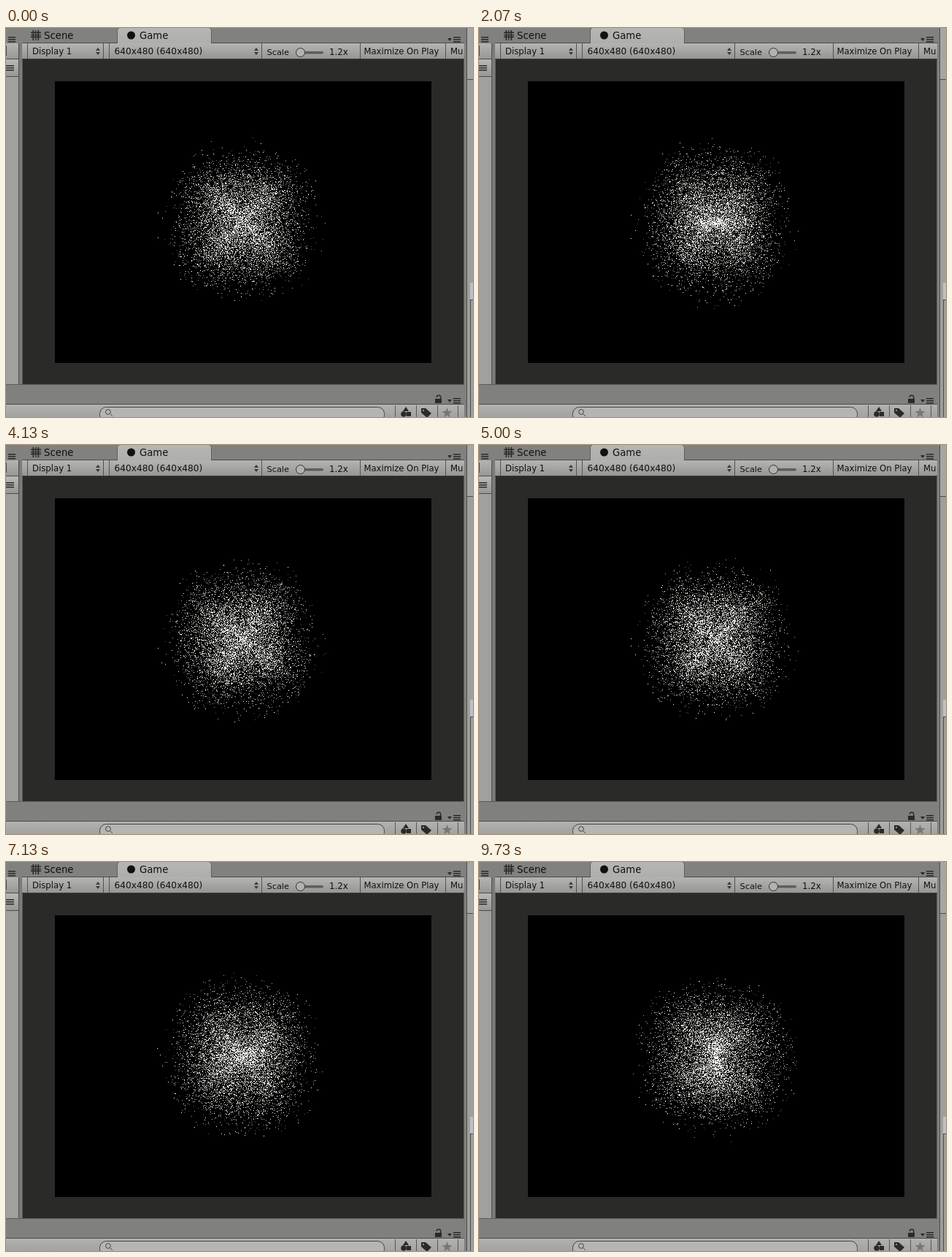
Write an HTML page with a canvas that moves like this. It is 640 px wide and 533 px high and loops after 9790 ms.

```html
<!DOCTYPE html>
<html lang="en">
<head>
<meta charset="utf-8">
<title>Particle ball</title>
<style>
html, body { margin: 0; width: 100%; height: 100%; overflow: hidden; background: #818180; }
canvas { display: block; }
</style>
</head>
<body>
<canvas id="stage" width="640" height="533"></canvas>
<script>
const ctx = document.getElementById('stage').getContext('2d');
const LOOP = 9790, FPS = 15, COUNT = 10000, RADIUS = 121;
const VIEW = { x: 67, y: 73, w: 516, h: 386 };
const CENTER = { x: 324, y: 266 };
const INK = '#111110', EDGE = '#4c4c48', ICON = '#2a2a28', FRAME = '#5c5c50';

function rect(x, y, w, h, fill) {
  ctx.fillStyle = fill;
  ctx.fillRect(x, y, w, h);
}

function shade(x, y, w, h, top, bottom) {
  const g = ctx.createLinearGradient(0, y, 0, y + h);
  g.addColorStop(0, top);
  g.addColorStop(1, bottom);
  rect(x, y, w, h, g);
}

function poly(points, fill) {
  ctx.beginPath();
  points.forEach(([x, y]) => ctx.lineTo(x, y));
  ctx.closePath();
  ctx.fillStyle = fill;
  ctx.fill();
}

function disc(x, y, r, fill, stroke) {
  ctx.beginPath();
  ctx.arc(x, y, r, 0, Math.PI * 2);
  if (fill) { ctx.fillStyle = fill; ctx.fill(); }
  if (stroke) { ctx.strokeStyle = stroke; ctx.stroke(); }
}

function label(text, x, y, size) {
  ctx.font = `${size}px "DejaVu Sans", sans-serif`;
  ctx.fillStyle = INK;
  ctx.fillText(text, x, y);
}

function bars(x, y, w) {
  for (let i = 0; i < 3; i++) rect(x, y + i * 3, w, 1.5, ICON);
}

function panelMenu(x, y) {
  poly([[x, y + 2], [x + 6, y + 2], [x + 3, y + 6]], ICON);
  bars(x + 8, y, 10);
}

function stepper(x, y) {
  poly([[x - 3, y - 1], [x + 3, y - 1], [x, y - 5]], '#3a3a38');
  poly([[x - 3, y + 1], [x + 3, y + 1], [x, y + 5]], '#3a3a38');
}

function drawSidePanels() {
  shade(0, 21, 17, 22, '#b4b4b2', '#969694');
  shade(0, 43, 17, 23, '#b8b8b6', '#989896');
  rect(0, 42, 17, 1, EDGE);
  rect(0, 24, 1, 14, EDGE);
  rect(0, 66, 17, 1, EDGE);
  rect(0, 67, 17, 422, '#a0a09e');
  bars(0, 51, 11);
  bars(3, 12, 10);
  rect(17, 21, 1, 468, EDGE);
  rect(18, 21, 4, 468, '#7b7b78');

  rect(628, 0, 4, 533, '#80807e');
  rect(631, 0, 1, 533, EDGE);
  rect(632, 0, 8, 70, '#a6a6a4');
  rect(632, 70, 8, 463, '#9f9f9d');
  rect(632, 70, 8, 1, EDGE);
  rect(636, 349, 4, 24, '#c0c0c4');
  rect(636, 372, 4, 1, EDGE);
  rect(636, 373, 1, 160, EDGE);
}

function drawTabs() {
  for (const x of [37.5, 44.5]) rect(x - 1, 3, 1.6, 14, ICON);
  for (const y of [6.5, 12.5]) rect(34, y - 1, 14, 1.6, ICON);
  rect(40.2, 3, 1.2, 14, ICON);
  rect(34, 9, 14, 1.2, ICON);
  label('Scene', 52, 15, 13.3);

  const g = ctx.createLinearGradient(0, 0, 0, 21);
  g.addColorStop(0, '#b6b6b4');
  g.addColorStop(1, '#aeaeac');
  ctx.beginPath();
  ctx.roundRect(152.5, -0.5, 129, 25, [4, 4, 0, 0]);
  ctx.fillStyle = g;
  ctx.strokeStyle = '#60605c';
  ctx.fill();
  ctx.stroke();
  disc(171.5, 10, 5.5, INK);
  label('Game', 183, 15, 13.2);
  panelMenu(605, 12);
}

function drawToolbar() {
  shade(22, 21, 606, 21, '#b4b4b2', '#969694');
  rect(22, 20, 131, 1, EDGE);
  rect(281, 20, 347, 1, EDGE);
  rect(22, 42, 606, 1, '#3b3b38');
  for (const x of [29, 133, 141, 350, 485, 602]) rect(x, 21, 1, 21, '#52524e');
  label('Display 1', 36, 36, 11.7);
  stepper(126, 32);
  label('640x480 (640x480)', 148.5, 36, 12.2);
  stepper(343, 32);
  label('Scale', 357.5, 37, 11.3);
  ctx.beginPath();
  ctx.roundRect(397, 32, 38, 3.5, 2);
  ctx.fillStyle = '#5e5e5a';
  ctx.fill();
  disc(403.5, 33.5, 6, '#b2b2b2', '#333330');
  label('1.2x', 443, 37, 11.8);
  label('Maximize On Play', 490.5, 36, 11.6);
  ctx.save();
  ctx.beginPath();
  ctx.rect(603, 21, 23.5, 21);
  ctx.clip();
  label('Mute', 609, 36, 11.7);
  ctx.restore();
}

function drawFooter() {
  rect(0, 489, 628, 28, '#80807e');
  rect(0, 488, 628, 1, FRAME);
  shade(0, 516, 628, 17, '#b2b2b0', '#a2a2a0');
  rect(0, 515, 628, 1, EDGE);

  ctx.beginPath();
  ctx.roundRect(128.5, 519.5, 390, 20, 9);
  ctx.fillStyle = '#b5b5b3';
  ctx.strokeStyle = '#464642';
  ctx.fill();
  ctx.stroke();
  disc(140, 526, 3.4, null, '#464642');
  ctx.beginPath();
  ctx.moveTo(142.5, 528.5);
  ctx.lineTo(146, 532);
  ctx.stroke();

  for (const x of [533, 562, 591, 619]) rect(x, 517, 1, 16, '#575753');
  disc(545, 529, 3.8, ICON);
  poly([[544, 525], [548, 519], [552, 525]], ICON);
  rect(549, 526, 6, 6, ICON);
  poly([[569, 521], [575, 521], [583, 528], [577, 534], [569, 527]], ICON);
  disc(572, 524, 1.1, '#a9a9a7');
  const star = Array.from({ length: 10 }, (_, i) => {
    const r = i % 2 ? 3 : 7.5, a = i * Math.PI / 5 - Math.PI / 2;
    return [604.5 + r * Math.cos(a), 527.5 + r * Math.sin(a)];
  });
  poly(star, '#777775');

  rect(588, 508, 9, 6, ICON);
  ctx.beginPath();
  ctx.arc(593, 506, 2.7, Math.PI, Math.PI * 2);
  ctx.lineTo(595.7, 509);
  ctx.strokeStyle = ICON;
  ctx.lineWidth = 1.5;
  ctx.stroke();
  ctx.lineWidth = 1;
  panelMenu(605, 507);
}

function drawEditor() {
  rect(0, 0, 640, 533, '#818180');
  drawSidePanels();
  drawTabs();
  drawToolbar();
  rect(22, 43, 606, 446, '#2a2a28');
  rect(22, 43, 1, 446, FRAME);
  rect(627, 43, 1, 446, FRAME);
  drawFooter();
}

function makeRandom(seed) {
  return () => {
    seed = seed + 0x6D2B79F5 | 0;
    let n = Math.imul(seed ^ seed >>> 15, 1 | seed);
    n = n + Math.imul(n ^ n >>> 7, 61 | n) ^ n;
    return ((n ^ n >>> 14) >>> 0) / 4294967296;
  };
}

// Cube samples pushed onto rays crowd the four diagonals of the ball;
// averaging two radii keeps the core broad and thins out the rim.
const random = makeRandom(41);
const particles = Array.from({ length: COUNT }, () => {
  const v = [random() * 2 - 1, random() * 2 - 1, random() * 2 - 1];
  const scale = RADIUS * (random() + random()) / 2 / Math.hypot(...v);
  return v.map(c => c * scale);
});
const tones = [
  { color: '#5a5a58', until: 0.4 },
  { color: '#a6a6a0', until: 0.74 },
  { color: '#fffffa', until: 1 }
];

// Seconds, then pitch, yaw and roll in degrees.
const poses = [
  [0, 0, 0, 0], [2.07, 45, 0, 0], [3.33, 55, 5, 16], [5, 90, 0, 0],
  [6.07, 108, -18, -8], [8.2, 135, 0, 0], [9.8, 180, 45, 0]
];

function poseAt(t) {
  const next = Math.max(1, poses.findIndex(p => p[0] > t));
  const a = poses[next - 1], b = poses[next];
  const k = (t - a[0]) / (b[0] - a[0]);
  return [1, 2, 3].map(i => (a[i] + (b[i] - a[i]) * k) * Math.PI / 180);
}

function drawBall(t) {
  const [pitch, yaw, roll] = poseAt(t);
  const cp = Math.cos(pitch), sp = Math.sin(pitch);
  const cy = Math.cos(yaw), sy = Math.sin(yaw);
  const cr = Math.cos(roll), sr = Math.sin(roll);
  rect(VIEW.x, VIEW.y, VIEW.w, VIEW.h, '#000');
  ctx.globalCompositeOperation = 'lighter';
  let i = 0;
  for (const { color, until } of tones) {
    ctx.fillStyle = color;
    for (; i < COUNT * until; i++) {
      const [px, py, pz] = particles[i];
      const y1 = py * cp - pz * sp, z1 = py * sp + pz * cp;
      const x1 = px * cy + z1 * sy;
      const x = x1 * cr + y1 * sr, y = y1 * cr - x1 * sr;
      ctx.fillRect(Math.round(CENTER.x + x), Math.round(CENTER.y + y), 1, 1);
    }
  }
  ctx.globalCompositeOperation = 'source-over';
}

let shown = -1;
function tick() {
  const step = Math.floor((performance.now() % LOOP + 4) * FPS / 1000);
  if (step !== shown) {
    shown = step;
    drawBall(Math.min(step, 146) / FPS);
  }
  requestAnimationFrame(tick);
}

drawEditor();
tick();
</script>
</body>
</html>
```
